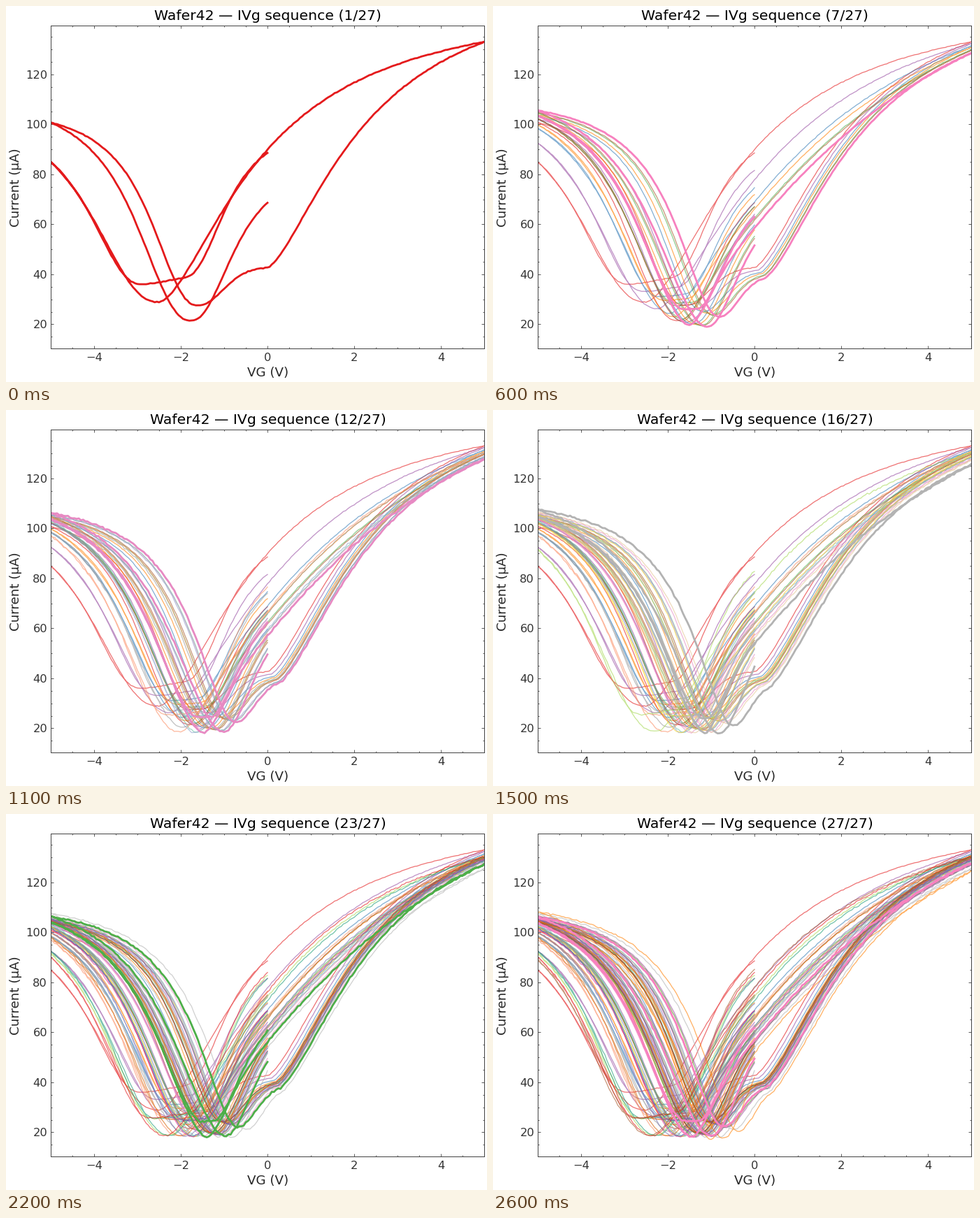
Recreate the animation shown at these times as a matplotlib script. Size 688 px wide and 538 px high, loop 2700 ms.

```python
import numpy as np
import matplotlib.pyplot as plt
from matplotlib.animation import FuncAnimation
from matplotlib.ticker import AutoMinorLocator, MultipleLocator

W, H = 688, 538
LEFT, RIGHT, TOP, BOTTOM = 63.8, 684.2, 27.8, 489.8

# The threshold drifts up over a few runs, then resets: (first, last, runs).
DRIFTS = [(0, .62, 3), (.2, .74, 4), (.42, .66, 2), (.35, .76, 3),
          (.17, 1, 4), (.2, .57, 4), (.13, .82, 3), (.85, 1.1, 2), (.1, .77, 2)]
SHIFTS = np.concatenate([lo + (hi - lo) * np.linspace(0, 1, k) ** .6
                         for lo, hi, k in DRIFTS])
RUNS = len(SHIFTS)


def palette(name, count, skip=None):
    colors = plt.get_cmap(name).colors
    return [c for i, c in enumerate(colors) if i != skip][:count]


COLORS = palette("Set1", 8, skip=5) + palette("Set2", 8) + palette("Dark2", 4)


def mix(pair, t):
    start, end = np.array(pair, float)
    return start + (end - start) * t


def arm(u, reach, k, w):
    """Saturating rise from 0 at u = 0 to 1 at u = reach."""
    def rise(s):
        return s ** k / (s ** k + w ** k)
    return rise(np.maximum(u, 0)) / rise(reach)


def valley(v, t, low, floor, ends, left, right, shelf=(0, 0), delay=(0, 0),
           dip=0):
    """Current along v; every pair holds the fresh and the shifted value."""
    low, shelf = mix(low, t), mix(shelf, t)
    floor = mix(floor, t) - dip
    onset = low + mix(delay, t)
    u = np.maximum(v - low, 0)
    step = shelf * (1 - np.exp(-(u / mix((.8, .55), t)) ** 2))
    fall = arm(low - v, low - v[0], mix((2.3, 1.8), t), mix(left, t))
    rise = arm(v - onset, v[-1] - onset, *mix(right, t))
    return (floor + step + (ends[0] - floor) * fall
            + (ends[1] - floor - shelf) * rise)


def sweep(n):
    """Full gate sweep 0, -5, 5, -5, 0 of run n."""
    b = SHIFTS[n]
    settled = min(1, n / 8) ** 3
    a = .9 * b + settled * (.5 + .5 * b * b - .9 * b)
    dip = 10 * max(0, 1 - b) * settled
    start = mix((100.7, 107.5), a)
    back = mix((104.5, 85), max(0, 1 - b) ** 2.2)
    top = mix((133, 125.5), a ** 1.5)

    half, full = np.linspace(-5, 0, 101), np.linspace(-5, 5, 201)
    first = valley(half, a, (-1.76, -.82), (21.5, 18),
                   (start, mix((68.7, 44.5), a)),
                   left=(1.45, 1.6), right=((2.2, 1.15), (2, .9)))
    up = valley(full, a, (-1.6, -.5), (27.5, 21), (start, top),
                left=(1.25, 1.2), right=((1.5, 2.4), (1.5, 2.4)),
                shelf=(15.5, 17), delay=(1.6, .85))
    down = valley(full, b, (-2.5, -1.13), (28.8, 18), (back, top),
                  left=(1.8, 1.4), right=((1.6, 2.5), (1.2, 6)),
                  shelf=(0, 14), dip=dip)
    last = valley(half, b, (-2.9, -1.2), (36, 24),
                  (back, mix((88.5, 54), b)),
                  left=(1.4, 1.4), right=((2.4, 1.1), (1.8, .9)),
                  shelf=(3.3, 0), delay=(.95, .1), dip=dip)

    v = np.concatenate([half[::-1], full, full[::-1], half])
    i = np.concatenate([first[::-1], up, down[::-1], last])
    rng = np.random.default_rng(100 + n)
    return v, i + rng.normal(0, .08 if n < 7 else .18, len(i))


# At 72 dpi one point is one pixel.
plt.rcParams.update({"font.family": "DejaVu Sans", "axes.linewidth": 1})
fig = plt.figure(figsize=(W / 72, H / 72), dpi=72, facecolor="white")
ax = fig.add_axes([LEFT / W, 1 - BOTTOM / H,
                   (RIGHT - LEFT) / W, (BOTTOM - TOP) / H])
ax.set_xlim(-5, 5)
ax.set_ylim(10.4, 139.55)
for axis, step in ((ax.xaxis, 2), (ax.yaxis, 20)):
    axis.set_major_locator(MultipleLocator(step))
    axis.set_minor_locator(AutoMinorLocator(4))
ax.tick_params(which="both", direction="in", top=True, right=True,
               width=.8, color="#333333", labelcolor="#333333")
ax.tick_params(which="major", length=4, labelsize=16.3)
ax.tick_params(which="minor", length=2)
ax.tick_params(axis="x", pad=6)
ax.tick_params(axis="y", pad=4.8)
for spine in ax.spines.values():
    spine.set_color("#444444")


def label(x, y, text, size, color="#262626", **kw):
    return fig.text(x / W, 1 - y / H, text, size=size, color=color,
                    ha="center", va="baseline", **kw)


label(374.4, 530.5, "VG (V)", 18.3)
label(19.3, 259.5, "Current (µA)", 18.3, rotation=90, rotation_mode="anchor")
title = label(374.4, 20, "", 20.4, "black")

lines = [ax.plot(*sweep(n), color=COLORS[n % len(COLORS)],
                 solid_joinstyle="round")[0] for n in range(RUNS)]


def draw(frame):
    for n, line in enumerate(lines):
        current = n == frame
        line.set_visible(n <= frame)
        line.set_linewidth(2.8 if current else 1.3)
        line.set_alpha(1 if current else .6)
    title.set_text(f"Wafer42 — IVg sequence ({frame + 1}/{RUNS})")
    return lines + [title]


anim = FuncAnimation(fig, draw, frames=RUNS, interval=100, repeat=True,
                     repeat_delay=0, blit=False)
plt.show()
```
